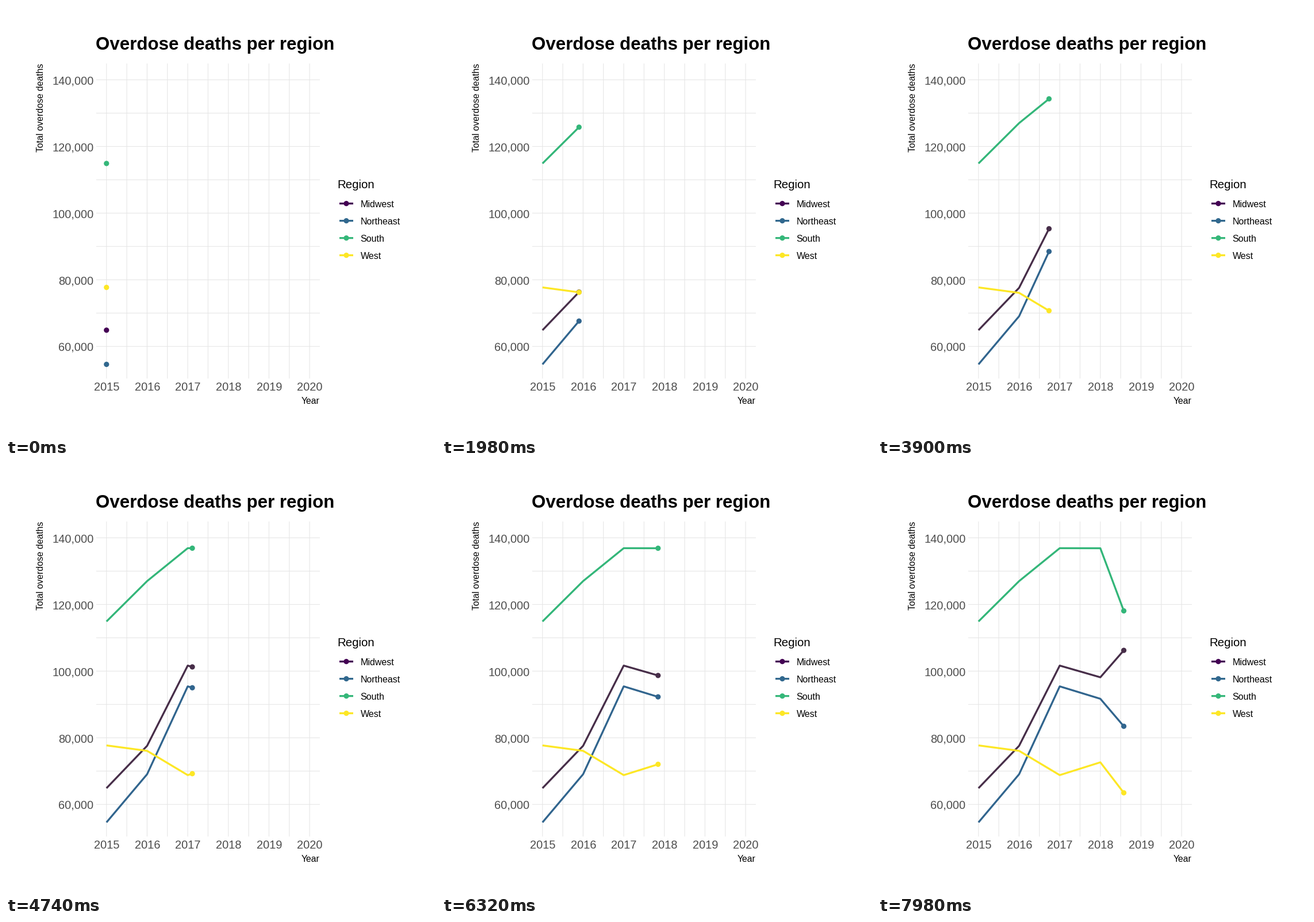
Animation, 748 px wide and 748 px high, one loop 8000 ms. Source, as a matplotlib script:

```python
import numpy as np
import matplotlib.pyplot as plt
from matplotlib.animation import FuncAnimation
from matplotlib.patches import Circle

SIZE, DPI = 748, 100
PT = 72 / DPI                      # points per pixel
TICK_MS, LOOP_MS = 20, 8000
YEARS = np.arange(2015, 2021)
YEAR_STEP = 5 / 239                # years revealed per step
LEFT, RIGHT, TOP, BOTTOM = 157, 546, 100, 648
LINE_W, DOT_R = 3.3, 4.6

# name, legend colour, trace colour, yearly totals 2015-2019
REGIONS = [
    ("Midwest", "#440154", "#472e49", [64880, 77590, 101660, 98150, 112140]),
    ("Northeast", "#31688e", "#31658e", [54620, 69060, 95430, 91700, 77420]),
    ("South", "#35b779", "#33b679", [114900, 127010, 136890, 136870, 104330]),
    ("West", "#fde725", "#fde725", [77710, 76080, 68800, 72640, 56790]),
]

plt.rcParams["font.family"] = "Liberation Sans"

fig = plt.figure(figsize=(SIZE / DPI, SIZE / DPI), dpi=DPI, facecolor="white")
ax = fig.add_axes([0, 0, 1, 1])
ax.set_xlim(0, SIZE)
ax.set_ylim(SIZE, 0)
ax.axis("off")


def year_x(year):
    return 174.8 + (year - 2015) * 70.66


def value_y(value):
    return 592.2 - (value - 60000) * 0.0057975


def label(x, y, text, size, color="black", **kw):
    ax.text(x, y, text, fontsize=size * PT, color=color, va="baseline", **kw)


def stroke(x, y, color, width, z):
    return ax.plot(x, y, color=color, lw=width * PT, zorder=z, snap=False,
                   solid_capstyle="butt", solid_joinstyle="round")[0]


def dot(x, y, color, z):
    return ax.add_patch(Circle((x, y), DOT_R, color=color, lw=0, zorder=z))


# grid
for year in np.arange(2015, 2020.1, 0.5):
    stroke([year_x(year)] * 2, [TOP, BOTTOM], "#e6e6e6", 1.1, 1)
for value in range(60000, 140001, 10000):
    stroke([LEFT, RIGHT], [value_y(value)] * 2, "#e6e6e6", 1.1, 1)

# titles and axis labels
label(156.5, 76, "Overdose deaths per region", 31.3, weight="bold")
label(RIGHT, 692, "Year", 15.75, ha="right")
ax.text(65, TOP, "Total overdose deaths", fontsize=15.75 * PT, rotation=90,
        rotation_mode="anchor", ha="right", va="baseline")
for year in YEARS:
    label(year_x(year) + 0.5, 669, str(year), 20, "#4d4d4d", ha="center")
for value in range(60000, 140001, 20000):
    label(152.5, value_y(value) + 7.8, f"{value:,}", 20, "#4d4d4d", ha="right")

# legend
label(576.5, 317, "Region", 20.5)
for i, (name, color, _, _) in enumerate(REGIONS):
    y = 343.6 + 30 * i
    stroke([580, 604], [y, y], color, LINE_W, 2)
    dot(592, y, color, 3)
    label(616.5, y + 6.2, name, 16)

# moving traces
traces = []
for i, (_, key, color, totals) in enumerate(REGIONS):
    line = stroke([], [], color, LINE_W, 4 + i)
    traces.append((line, dot(0, 0, key, 10 + i), key, color, totals))


def step_at(ms):
    """Steps come in threes every 140 ms: 20, 20 and 100 ms long."""
    if ms < 120:
        return int(ms >= 20)
    cycle, rest = divmod(ms - 120, 140)
    return 2 + 3 * cycle + min(rest // 20, 2)


def update(frame):
    step = step_at(frame * TICK_MS)
    now = 2015 + step * YEAR_STEP
    passed = int(now - 2015) + 1
    xs = np.append(year_x(YEARS[:passed]), year_x(now))
    for line, head, key, color, totals in traces:
        value = np.interp(now, YEARS[:5], totals)
        ys = value_y(np.append(totals[:passed], value))
        line.set_data(xs, ys)
        head.set_center((xs[-1], ys[-1]))
        head.set_color(color if step else key)
    return [artist for trace in traces for artist in trace[:2]]


anim = FuncAnimation(fig, update, frames=LOOP_MS // TICK_MS, interval=TICK_MS,
                     repeat=True, repeat_delay=0, blit=False)
plt.show()
```
